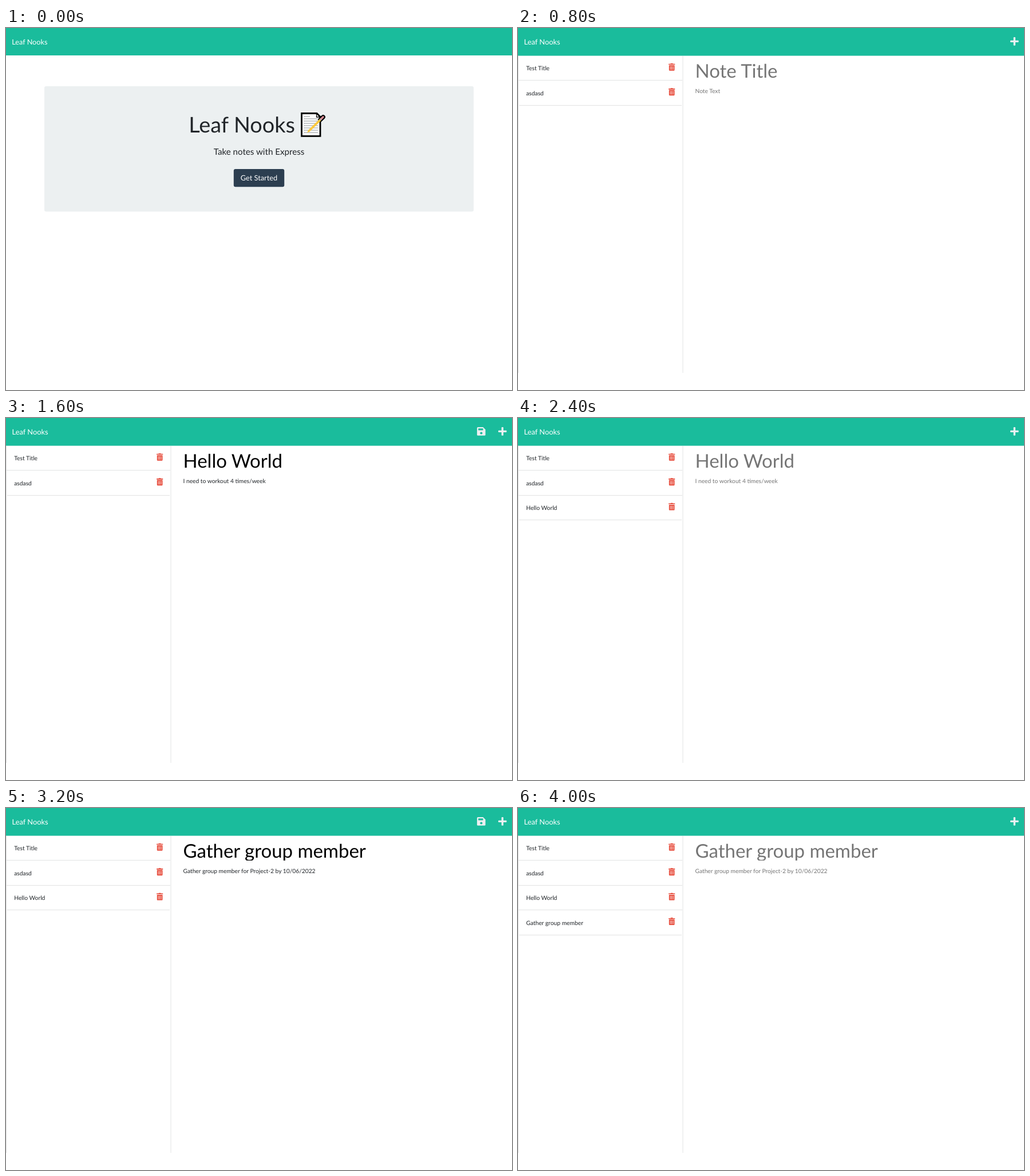
Recreate the animation shown at these times as an HTML page. Size 884 px wide and 634 px high, loop 4.8 s.

```html
<!DOCTYPE html>
<html lang="en">
<head>
<meta charset="utf-8">
<title>Leaf Nooks</title>
<style>
  html, body { margin: 0; width: 100%; height: 100%; overflow: hidden; background: #fff; }
  svg { display: block; font-family: Lato, sans-serif; text-rendering: geometricPrecision; }
</style>
</head>
<body>
<svg id="stage" width="884" height="634" viewBox="0 0 884 634"></svg>
<script>
const STEP = 800;
const APP = 'Leaf Nooks';
const GREEN = '#1abc9c', LIGHT = '#ecf0f1', INK = '#212529', RULE = '#e2e3e3', FADED = '#757575';

const hello = ['Hello World', 'I need to workout 4 times/week'];
const gather = ['Gather group member', 'Gather group member for Project-2 by 10/06/2022'];
const scenes = [
  null,
  { note: ['Note Title', 'Note Text'], count: 2 },
  { note: hello, count: 2, editing: true },
  { note: hello, count: 3 },
  { note: gather, count: 3, editing: true },
  { note: gather, count: 4 },
];
const titles = ['Test Title', 'asdasd', hello[0], gather[0]];

const rect = (x, y, w, h, fill, r = 0) =>
  `<rect x="${x}" y="${y}" width="${w}" height="${h}" rx="${r}" fill="${fill}"/>`;
const text = (x, y, size, fill, str, extra = '') =>
  `<text x="${x}" y="${y}" font-size="${size}" fill="${fill}" ${extra}>${str}</text>`;
const middle = 'text-anchor="middle"';

const trash = (x, y) => `<g transform="translate(${x} ${y}) scale(.0252)">
  <path fill="#e74c3c" fill-rule="evenodd" d="M32 128H416V464a48 48 0 0 1-48 48H80a48 48 0 0 1-48-48Z
    ${[112, 208, 304].map(sx => `M${sx} 208a16 16 0 0 1 32 0v224a16 16 0 0 1-32 0Z`).join('')}
    M16 32H136L150 8Q155 0 167 0H281Q293 0 298 8L312 32H432a16 16 0 0 1 16 16V80a16 16 0 0 1-16 16H16a16 16 0 0 1-16-16V48a16 16 0 0 1 16-16Z"/></g>`;

const plus = rect(860, 21.7, 14.6, 3.4, LIGHT, 1) + rect(865.6, 16.1, 3.4, 14.6, LIGHT, 1);

const disk = `<path fill="${LIGHT}" d="M824.5 16.1H833.4L837.6 20.3V29.2Q837.6 30.8 836 30.8H824.5Q822.9 30.8 822.9 29.2V17.7Q822.9 16.1 824.5 16.1Z"/>
  ${rect(825.1, 18.3, 8.4, 3.1, GREEN, .4)}<circle cx="830.3" cy="26.5" r="2.1" fill="${GREEN}"/>`;

const memo = () => {
  const lines = Array.from({ length: 8 }, (_, i) => `M520 ${155 + i * 4}h${i ? 25 : 11}`).join('');
  return `<g fill="none">
    <path d="M516.5 149.5H543L549 155.5V189.3H516.5Z" fill="#fff" stroke="#000" stroke-width="2.8"/>
    <path d="M542.5 150V156H548.5" stroke="#000" stroke-width="1.3"/>
    <path d="${lines}" stroke="#b4b8bb" stroke-width="1.3"/>
    <path d="M549 160.8L554 156" stroke="#000" stroke-width="7.6" stroke-linecap="round"/>
    <path d="M529.5 180L549 160.8" stroke="#fcc93d" stroke-width="3.8"/>
    <path d="M526 183.5L528.2 178.6L530.9 181.3Z" fill="#fcc93d"/>
    <path d="M549 160.8L550.8 159" stroke="#b9c3ca" stroke-width="3.6"/>
    <path d="M551 158.8L554 155.9" stroke="#d98a94" stroke-width="3.4" stroke-linecap="round"/></g>`;
};

const home = () =>
  rect(0, 0, 884, 48, GREEN) + text(10.3, 28.5, 12.67, '#fff', APP) +
  rect(67, 102, 750, 219.5, LIGHT, 3) +
  text(319.3, 183, 37.84, INK, APP) + memo() +
  text(442, 221.6, 15.15, INK, 'Take notes with Express', middle) +
  rect(397.8, 247, 88.4, 31.2, '#2c3e50', 3) +
  text(442, 267.3, 12.75, '#fff', 'Get Started', middle);

const row = (title, i, all) => {
  const inset = i === all.length - 1 ? 2 : 1;
  return text(14.2, 74 + i * 43.5, 10.3, INK, title) +
    trash(263, 61.9 + i * 43.4) +
    rect(inset, Math.floor(91.5 + i * 43.5), 288 - 2 * inset, 1, RULE);
};

const editor = ({ note, count, editing }) =>
  rect(0, 0, 884, 48.6, GREEN) + text(10.5, 28.9, 12.88, '#fff', APP) +
  plus + (editing ? disk : '') +
  rect(0, 49, 1, 555, RULE) + rect(287.5, 49, 1, 555, RULE) +
  titles.slice(0, count).map(row).join('') +
  '<clipPath id="field"><path d="M300 50H884V92H300Z"/></clipPath>' +
  text(309.6, 87, 32.95, editing ? '#000' : FADED, note[0], 'clip-path="url(#field)"') +
  text(309.5, 113.9, 10.24, editing ? INK : FADED, note[1]);

const stage = document.getElementById('stage');
let shown = -1;
function draw(now) {
  const index = Math.floor(now / STEP) % scenes.length;
  if (index !== shown) {
    stage.innerHTML = scenes[index] ? editor(scenes[index]) : home();
    shown = index;
  }
  requestAnimationFrame(draw);
}
draw(performance.now());
</script>
</body>
</html>
```
